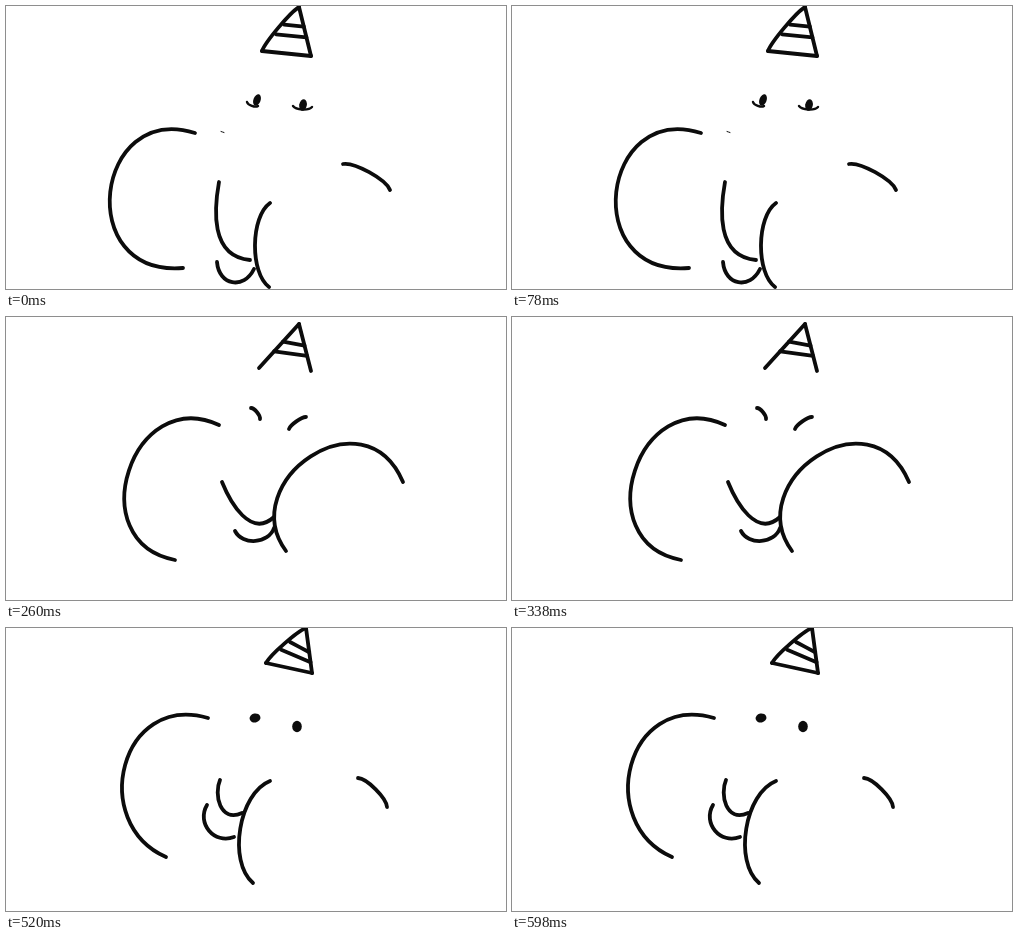
An HTML page with a canvas that plays this animation: 500 by 283 pixels, repeating every 0.65 s.

```html
<!DOCTYPE html>
<html lang="en">
<head>
<meta charset="utf-8">
<title>Pencil elephant</title>
<style>
html, body { margin: 0; width: 100%; height: 100%; overflow: hidden; background: #fff; }
canvas { display: block; width: 500px; height: 283px; }
</style>
</head>
<body>
<canvas id="stage" width="500" height="283"></canvas>
<script>
const ctx = document.getElementById('stage').getContext('2d');
const HOLD = 130;
const INK = '#0c0c0c';
const PEN = 3.8;
const LASH = 2.4;

const mix = (a, b, t) => a.map((v, i) => v + (b[i] - v) * t);

function stroke(from, c1, c2, to, width = PEN) {
  ctx.lineWidth = width;
  ctx.beginPath();
  ctx.moveTo(...from);
  ctx.bezierCurveTo(...c1, ...c2, ...to);
  ctx.stroke();
}

// One cubic that passes through four points at t = 0, 1/3, 2/3 and 1.
function sweep(a, b, c, d) {
  const control = (p, q, r, s) => p.map((v, i) => (-5 * v + 18 * q[i] - 9 * r[i] + 2 * s[i]) / 6);
  stroke(a, control(a, b, c, d), control(d, c, b, a), d);
}

// A symmetric arc; positive depth bends clockwise from the direction of travel.
function bow(a, b, depth, width) {
  const [dx, dy] = [b[0] - a[0], b[1] - a[1]];
  const k = depth * 4 / 3 / Math.hypot(dx, dy);
  const control = t => [a[0] + dx * t - dy * k, a[1] + dy * t + dx * k];
  stroke(a, control(1 / 6), control(5 / 6), b, width);
}

// A party hat whose two stripes drop by `slant` towards the right edge.
function hat(left, tip, right, slant, closed = true) {
  bow(left, tip, closed ? -2.5 : 0);
  bow(tip, right, 0);
  if (closed) bow(right, left, 0);
  for (const t of [0.4, 0.62]) {
    bow(mix(tip, left, t), mix(tip, right, t + slant), 0);
  }
}

function eye(x, y, rx, ry, tilt = 0) {
  ctx.beginPath();
  ctx.ellipse(x, y, rx, ry, tilt, 0, Math.PI * 2);
  ctx.fill();
}

const poses = [
  function low() {
    hat([256, 45], [293, 1], [305, 50], 0);
    eye(251, 94, 3.6, 6, 0.35);
    bow([241, 96], [252, 100], 2, LASH);
    eye(297, 99, 3.8, 5.8, 0.2);
    bow([287, 100], [306, 101], 3, LASH);
    sweep([189, 127], [117, 150], [109, 224], [177, 262]);
    bow([215, 125.5], [218, 126.5], 0, 1);
    bow([337, 158], [384, 184], -5.5);
    sweep([213, 176], [210, 207], [217, 238], [244, 254]);
    bow([264, 197], [263, 281], 14.5);
    bow([211, 256], [248, 263], 17);
  },
  function rise() {
    hat([258, 46], [299, 6], [303, 50], 0.05);
    eye(251, 93, 3.8, 5, 0.6);
    bow([241, 96], [249, 100], 1, LASH);
    eye(294.5, 99.5, 4, 5);
    bow([288, 102], [301, 103], 1, LASH);
    sweep([194, 115], [126, 142], [120, 216], [179, 265]);
    sweep([389, 172], [320, 143], [263, 194], [281, 264]);
    sweep([214, 171], [218, 199], [232, 226], [256, 222]);
    bow([222, 236], [253, 241], 8.5);
  },
  function high() {
    hat([253, 51], [293, 7], [305, 54], 0.06, false);
    bow([245, 91], [254, 102], -2);
    bow([283, 112], [300, 100], -2);
    sweep([213, 108], [142, 121], [119, 191], [169, 243]);
    sweep([397, 165], [338, 127], [279, 165], [280, 234]);
    sweep([216, 165], [228, 188], [246, 205], [268, 200]);
    bow([229, 214], [268, 211], 11.5);
  },
  function swing() {
    hat([254, 53], [291, 9], [299, 61], 0.07);
    eye(248, 93, 4, 5, 0.6);
    bow([240, 92], [247, 100], -1, LASH);
    eye(291.5, 101, 4.5, 5.5);
    bow([286, 97], [299, 101], 3, LASH);
    sweep([204, 97], [132, 111], [113, 180], [163, 233]);
    sweep([382, 160], [315, 133], [256, 177], [264, 248]);
    sweep([213, 160], [217, 179], [227, 195], [247, 199]);
    bow([214, 199], [246, 215], 8.5);
  },
  function fall() {
    hat([260, 35], [300, 0], [306, 45], 0.14);
    eye(249, 90, 5.5, 4.5, -0.2);
    eye(291, 98.5, 4.8, 5.8);
    sweep([202, 90], [135, 107], [117, 172], [160, 229]);
    bow([352, 150], [381, 179], -4.5);
    bow([264, 153], [247, 255], 21.5);
    sweep([214, 152], [212, 169], [219, 184], [236, 185]);
    bow([201, 177], [228, 209], 15);
  },
];

const start = performance.now();

function draw(now) {
  const elapsed = Math.max(0, now - start);
  ctx.fillStyle = '#fff';
  ctx.fillRect(0, 0, 500, 283);
  ctx.strokeStyle = ctx.fillStyle = INK;
  ctx.lineCap = 'round';
  poses[Math.floor(elapsed / HOLD) % poses.length]();
  requestAnimationFrame(draw);
}
draw(start);
</script>
</body>
</html>
```
